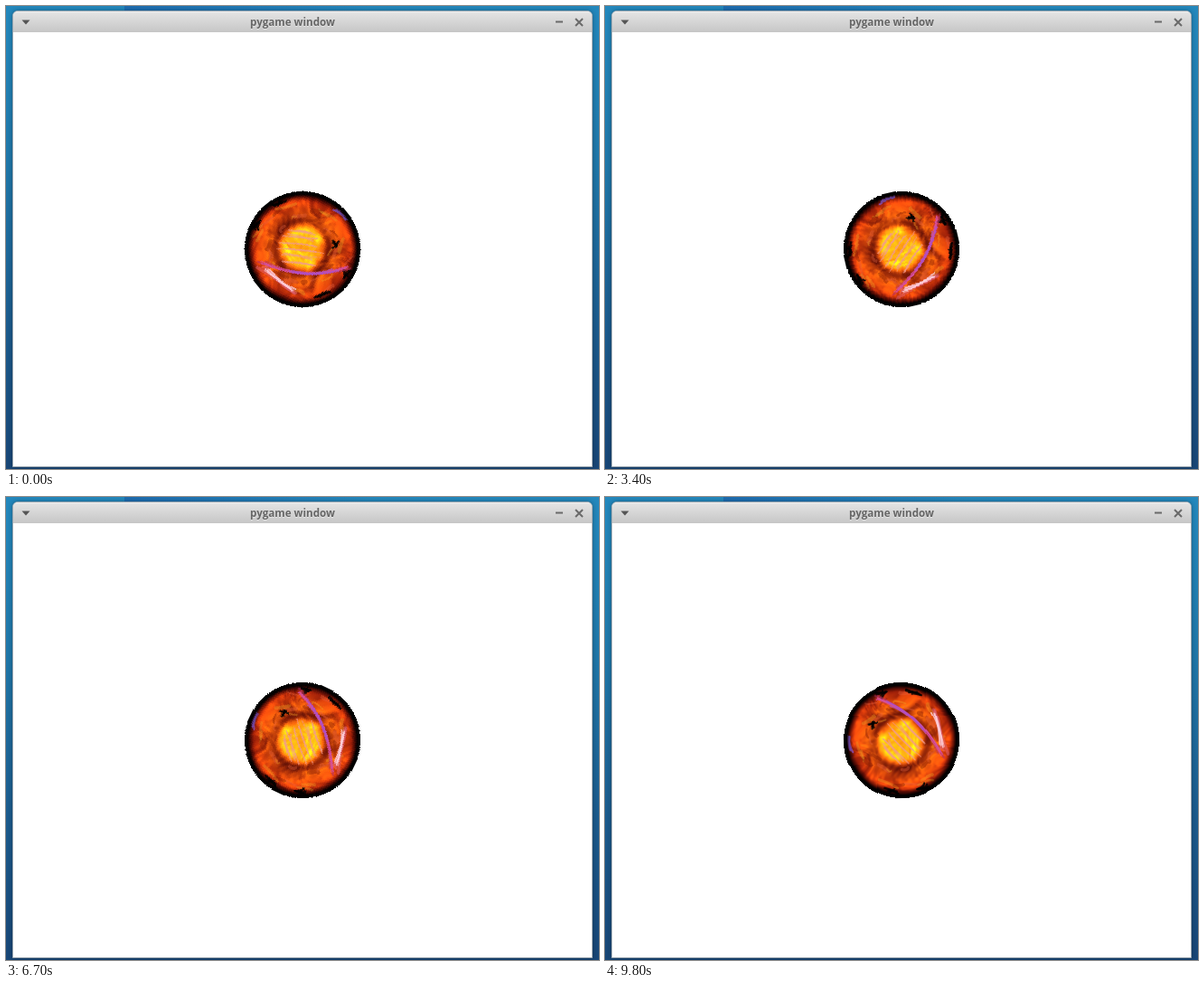
Recreate the animation shown at these times as an HTML page with a canvas. Size 656 px wide and 512 px high, loop 9900 ms.

```html
<!DOCTYPE html>
<html lang="en">
<head>
<meta charset="utf-8">
<title>pygame window</title>
<style>
  html, body { margin: 0; width: 100%; height: 100%; overflow: hidden; }
  body { position: relative; background: linear-gradient(#2388bd, #1f76a8 35%, #1b5a8c 70%, #184676); }
  .shade { position: absolute; left: 131px; top: 0; width: 270px; height: 6px;
    background: linear-gradient(90deg, #1d6cb0, #1d6cb000); }
  .window { position: absolute; left: 7px; top: 5px; width: 640px; height: 503px; background: #fff;
    border: 1px solid #9aa6b0; border-radius: 6px 6px 0 0; overflow: hidden; box-shadow: 0 0 5px #0005; }
  .bar { height: 23px; background: linear-gradient(#f0f0f0, #e2e2e2 2px, #c6c6c6); }
  .title { position: absolute; left: 0; top: 0; width: 618px; text-align: center;
    font: bold 11.6px/24px "Open Sans", sans-serif; color: #656565; text-shadow: 0 1px #e8e8e8; }
  .icons { position: absolute; left: 0; top: 0; }
  canvas { position: absolute; left: 260px; top: 201px; }
</style>
</head>
<body>
<div class="shade"></div>
<div class="window">
  <div class="bar"></div>
  <div class="title">pygame window</div>
  <svg class="icons" width="640" height="23">
    <path d="M9.5 9.5h9l-4.5 5z" fill="#555"/>
    <path d="M600 11.5h8M622 8l8 8M630 8l-8 8" stroke="#6a6a6a" stroke-width="2" fill="none"/>
  </svg>
</div>
<canvas id="ball" width="136" height="136"></canvas>
<script>
const R = 64, SIZE = 136, LOOP = 9900, STEP = 100;
const RAD = Math.PI / 180, TURN = -12.47 * RAD, TILT = 1221 * RAD;

const mix = (a, b, t) => a + (b - a) * t;
const smooth = (a, b, x) => {
  const t = Math.min(1, Math.max(0, (x - a) / (b - a)));
  return t * t * (3 - 2 * t);
};

function hash(x, y) {
  const s = Math.sin(x * 127.1 + y * 311.7) * 43758.5453;
  return s - Math.floor(s);
}

let seed = 0;
const jitter = amount => (hash(++seed, 3) * 2 - 1) * amount;

function noise(x, y) {
  const i = Math.floor(x), j = Math.floor(y);
  const u = smooth(0, 1, x - i), v = smooth(0, 1, y - j);
  return mix(mix(hash(i, j), hash(i + 1, j), u), mix(hash(i, j + 1), hash(i + 1, j + 1), u), v);
}

const fbm = (x, y) => noise(x, y) * .45 + noise(x * 2, y * 2) * .3 + noise(x * 4.3, y * 4.3) * .25;

// black through red and orange to yellow, redder towards the rim
function fire(heat, r) {
  const h = Math.max(0, heat);
  return [
    255 * Math.min(1, 1.5 * h),
    235 * h ** 1.9 * mix(1, .7, smooth(32, 58, r)),
    20 * h,
    255
  ];
}

function paintFire(g) {
  const img = g.createImageData(2 * R, 2 * R);
  for (let p = 0; p < 4 * R * R; p++) {
    const x = p % (2 * R) - R + .5, y = Math.floor(p / (2 * R)) - R + .5;
    const r = Math.hypot(x, y), core = Math.hypot(x + 1, y - 2);
    if (r > R) continue;
    const warp = 1.6 * noise(x / 22 + 40, y / 22 + 7);
    const n = fbm(x / 15 + warp + 11, y / 15 - warp + 23) - .5;
    const ring = Math.exp(-(((core - 30) / 4.5) ** 2));
    const heat = .56 + .38 * smooth(29, 17, core) - .17 * ring + .6 * n;
    img.data.set(fire(heat * smooth(67, 50, r), r), p * 4);
  }
  g.putImageData(img, 0, 0);
}

// a bundle of loose, nearly parallel curves
function strands(g, count, color, width, spread, x0, y0, cx, cy, x1, y1) {
  g.strokeStyle = color;
  for (let i = 0; i < count; i++) {
    const j = () => jitter(spread);
    g.lineWidth = width * (1 + jitter(.5));
    g.beginPath();
    g.moveTo(x0 + 3 * j(), y0 + j());
    g.quadraticCurveTo(cx + j(), cy + j(), x1 + 3 * j(), y1 + j());
    g.stroke();
  }
}

function makeBall() {
  const c = document.createElement('canvas');
  c.width = c.height = 2 * R;
  const g = c.getContext('2d');
  paintFire(g);
  g.globalCompositeOperation = 'source-atop';
  g.translate(R, R);
  g.rotate(-TILT);
  g.lineCap = 'round';
  g.filter = 'blur(.7px)';

  // wisps around the core
  for (let i = 0; i < 36; i++) {
    const a = i * 137.5 * RAD, r = 42 + jitter(11), b = a + .25;
    const x = r * Math.cos(a), y = r * Math.sin(a);
    const color = ['#e8603866', '#f0982066', '#80180066'][i % 3];
    strands(g, 1, color, 3, 2, x, y, x, y, r * Math.cos(b), r * Math.sin(b));
  }

  // pale bands across the core
  for (let y = -20; y < 16; y += 7) {
    const half = Math.sqrt(500 - y * y);
    strands(g, 3, '#f49a8c99', 1.4, 2, -half, y - 2, 0, y - 1, half * .8, y + 3);
  }

  // dark rifts, by angle and distance
  for (const [a, r] of [[-152, 57], [-116, 57], [30, 55], [65, 55], [-9, 37]]) {
    const x = r * Math.cos(a * RAD), y = r * Math.sin(a * RAD), s = r / 14;
    strands(g, 5, '#000c', 2, s / 2, x - y / 12, y + x / 12, x, y, x + y / 12, y - x / 12);
  }

  strands(g, 4, '#b8306866', 3, 2, -46, 15, 5, 36, 48, 20);
  strands(g, 4, '#d850a0cc', 1.2, 1.5, -44, 15, 5, 36, 48, 20);
  strands(g, 3, '#a850d0aa', 1.2, 1.5, -14, 25, 12, 31, 36, 23);
  strands(g, 4, '#e0607088', 3, 2, -45, 19, -27, 36, -6, 48);
  strands(g, 5, '#ffd0dccc', 1.2, 1.5, -40, 23, -26, 36, -11, 45);
  strands(g, 4, '#9860e0bb', 1.5, 1, 37, -44, 43, -41, 49, -33);

  g.filter = 'none';
  const rim = g.createRadialGradient(0, 0, 54, 0, 0, R);
  rim.addColorStop(0, '#0000');
  rim.addColorStop(.4, '#0005');
  rim.addColorStop(.72, '#000');
  g.fillStyle = rim;
  g.fillRect(-2 * R, -2 * R, 4 * R, 4 * R);
  return c;
}

const ball = makeBall();
const ctx = document.getElementById('ball').getContext('2d');
const start = performance.now();
ctx.imageSmoothingEnabled = false;

function draw() {
  const tick = Math.floor((performance.now() - start) % LOOP / STEP);
  ctx.setTransform(1, 0, 0, 1, 0, 0);
  ctx.clearRect(0, 0, SIZE, SIZE);
  ctx.translate(SIZE / 2, SIZE / 2);
  ctx.rotate(TILT + tick * TURN);
  ctx.drawImage(ball, -R, -R);
  requestAnimationFrame(draw);
}
draw();
</script>
</body>
</html>
```
